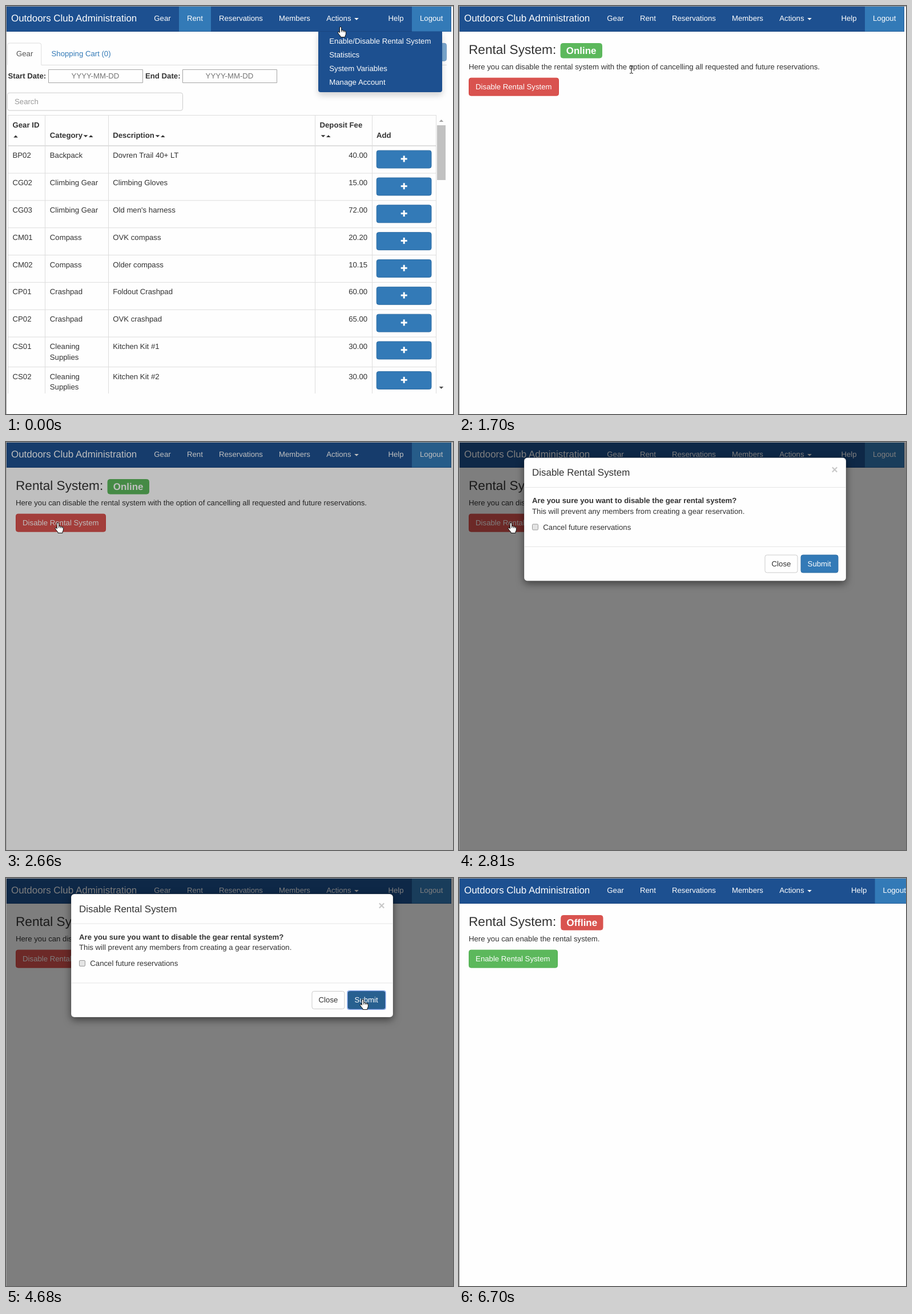
An HTML page with a canvas for the animation above (6800 ms loop, 783x715 px).

```html
<!DOCTYPE html>
<html lang="en">
<head>
<meta charset="utf-8">
<title>Rental system administration</title>
<style>
html, body { margin: 0; width: 100%; height: 100%; overflow: hidden; background: #fefefe; }
canvas { display: block; }
</style>
</head>
<body>
<canvas id="stage" width="783" height="715"></canvas>
<script>
const ctx = document.getElementById('stage').getContext('2d');
const LOOP = 6800;
const BODY = 13.19, LARGE = 16.96, HEADING = 22.6;
const WHITE = '#fefefe', INK = '#333', NAVY = '#1d5090', BLUE = '#337ab7';
const RED = '#d9534f', GREEN = '#5cb85c', LINE = '#ddd';

function text(str, x, y, color = INK, size = BODY, weight = 400, align = 'left') {
  ctx.font = `${weight} ${size}px "Liberation Sans", Arial, sans-serif`;
  ctx.textAlign = align;
  ctx.fillStyle = color;
  ctx.fillText(str, x, y);
}

function rect(x, y, w, h, color) {
  ctx.fillStyle = color;
  ctx.fillRect(x, y, w, h);
}

function box(x, y, w, h, radius, fill, border) {
  ctx.beginPath();
  ctx.roundRect(x + .5, y + .5, w - 1, h - 1, radius);
  ctx.fillStyle = fill;
  ctx.fill();
  ctx.strokeStyle = border || fill;
  ctx.lineWidth = 1;
  ctx.stroke();
}

function shadow(color, blur, dy) {
  ctx.shadowColor = color;
  ctx.shadowBlur = blur;
  ctx.shadowOffsetY = dy;
}

function focusRing(x, y, w, h) {
  ctx.beginPath();
  ctx.roundRect(x - .3, y - .3, w + .6, h + .6, 3);
  ctx.strokeStyle = 'rgba(105,150,230,.85)';
  ctx.lineWidth = 1.5;
  ctx.stroke();
}

function button(label, x, y, w, [fill, border], color = WHITE, focused = false) {
  box(x, y, w, 31.9, 3.5, fill, border);
  if (focused) focusRing(x, y, w, 31.9);
  text(label, x + 12.1, y + 20.1, color);
}

// dir 1 points down, -1 points up
function caret(x, y, dir, color = INK, r = 3.8) {
  ctx.beginPath();
  ctx.moveTo(x - r, y - dir * r / 2);
  ctx.lineTo(x + r, y - dir * r / 2);
  ctx.lineTo(x, y + dir * r / 2);
  ctx.fillStyle = color;
  ctx.fill();
}

function navbar(rentActive, shift) {
  rect(1, 1, shift ? 782 : 779, 44, '#1a4680');
  rect(2, 1, shift ? 781 : 777, 43, NAVY);
  if (rentActive) rect(303, 1, 56, 43.5, BLUE);
  rect(711 + shift, 1, 68.5, 43.5, BLUE);
  text('Outdoors Club Administration', 9, 27.2, WHITE, LARGE);
  const items = [['Gear', 259.3], ['Rent', 317], ['Reservations', 373], ['Members', 478],
    ['Actions', 561.3], ['Help', 669.5 + shift], ['Logout', 725 + shift]];
  for (const [label, x] of items) text(label, x, 25.8, WHITE);
  caret(614, 22.8, 1, WHITE);
}

const gear = [
  ['BP02', 'Backpack', 'Dovren Trail 40+ LT', '40.00'],
  ['CG02', 'Climbing Gear', 'Climbing Gloves', '15.00'],
  ['CG03', 'Climbing Gear', "Old men's harness", '72.00'],
  ['CM01', 'Compass', 'OVK compass', '20.20'],
  ['CM02', 'Compass', 'Older compass', '10.15'],
  ['CP01', 'Crashpad', 'Foldout Crashpad', '60.00'],
  ['CP02', 'Crashpad', 'OVK crashpad', '65.00'],
  ['CS01', 'Cleaning Supplies', 'Kitchen Kit #1', '30.00'],
  ['CS02', 'Cleaning Supplies', 'Kitchen Kit #2', '30.00']
];

function gearRow([id, category, description, fee], y) {
  const base = y + 21.2;
  text(id, 11.5, base);
  const lines = category.startsWith('Cleaning') ? category.split(' ') : [category];
  lines.forEach((line, i) => text(line, 76.8, base + i * 18.6));
  text(description, 187.2, base);
  text(fee, 633.2, base, INK, BODY, 400, 'right');
  box(648.7, y + 7.7, 96.8, 31.9, 3.5, BLUE, '#2e6da4');
  const cy = y + 22.9;
  rect(691.7, cy - 1.5, 11, 3, WHITE);
  rect(695.7, cy - 5.5, 3, 11, WHITE);
}

function gearTable() {
  const bold = (label, x, y) => text(label, x, y, INK, BODY, 700);
  ctx.save();
  ctx.beginPath();
  ctx.rect(0, 185, 783, 494);
  ctx.clip();
  rect(3, 191, 751, 1, LINE);
  rect(3, 244, 751, 1.9, LINE);
  for (const x of [3, 68, 179, 541, 641, 753]) rect(x, 191, 1, 488, LINE);
  bold('Gear ID', 11.5, 212.8);
  bold('Category', 76.8, 231.3);
  bold('Description', 187.2, 231.3);
  bold('Deposit Fee', 549.5, 212.8);
  bold('Add', 649, 231.3);
  caret(17, 228.5, -1);
  for (const x of [139.5, 265.5, 555.5]) {
    caret(x, 228.2, 1);
    caret(x + 9.3, 228.2, -1);
  }
  let y = 245;
  for (const row of gear) {
    if (y > 245) rect(3, y - .3, 751, 1, LINE);
    gearRow(row, y);
    y += row[1].startsWith('Cleaning') ? 52.6 : 47.83;
  }
  ctx.restore();
  rect(755, 209, 15, 96, '#c1c1c1');
  caret(762.5, 201, -1, '#a3a3a3');
  caret(762.5, 669, 1, '#505050');
}

function dateInput(x) {
  box(x, 111, 166, 24, 0, WHITE, '#a5a5a5');
  text('YYYY-MM-DD', x + 82.5, 127.3, '#757575', BODY, 400, 'center');
}

function rentPage(itemHover) {
  rect(62, 103, 710, 1, LINE);
  box(640, 64.8, 132, 31.9, 3.5, '#7aa8d0', '#7299c1');
  ctx.beginPath();
  ctx.moveTo(2.5, 103.5);
  ctx.lineTo(2.5, 68.5);
  ctx.arcTo(2.5, 65, 6, 65, 3.5);
  ctx.lineTo(58, 65);
  ctx.arcTo(61.8, 65, 61.8, 68.5, 3.5);
  ctx.lineTo(61.8, 103.5);
  ctx.strokeStyle = LINE;
  ctx.lineWidth = 1;
  ctx.stroke();
  text('Gear', 18, 87.8, '#555');
  text('Shopping Cart (0)', 79.5, 87.8, BLUE);
  text('Start Date:', 3.5, 127.3, INK, BODY, 700);
  text('End Date:', 244, 127.3, INK, BODY, 700);
  dateInput(74);
  dateInput(309);
  box(2, 151.7, 308, 31.9, 3.5, WHITE, '#ccc');
  text('Search', 15, 171.7, '#999');
  gearTable();

  ctx.save();
  shadow('rgba(0,0,0,.175)', 11, 5.6);
  ctx.beginPath();
  ctx.roundRect(547, 45, 217, 106, [0, 0, 4, 4]);
  ctx.fillStyle = NAVY;
  ctx.fill();
  ctx.restore();
  if (itemHover) rect(547, 50, 217, 24, BLUE);
  ['Enable/Disable Rental System', 'Statistics', 'System Variables', 'Manage Account']
    .forEach((label, i) => text(label, 566.3, 66.2 + i * 23.95, WHITE));
  navbar(true, 0);
}

function systemPage(t) {
  const online = t < 4960;
  const settled = t >= 5210;
  const nudge = settled ? .7 : 0;
  navbar(false, settled ? 17.6 : 0);
  text('Rental System:', 17, 83.6, INK, HEADING);
  box(177.6 + nudge, 65, online ? 73.4 : 74.2, 26.6, 4, online ? GREEN : RED);
  text(online ? 'Online' : 'Offline', 187.8 + nudge, 83.6, WHITE, LARGE, 700);
  if (online) {
    text('Here you can disable the rental system with the option of cancelling all requested and future reservations.', 17, 111.4);
    const pressed = t >= 2270 && t < 2660;
    const hovered = t >= 2000 && t < 2270;
    const look = pressed ? ['#ac2925', '#761c19'] : hovered ? ['#c9302c', '#ac2925'] : [RED, '#d43f3a'];
    button('Disable Rental System', 17, 125.7, 158, look, WHITE, t >= 2390 && t < 2660);
  } else {
    text('Here you can enable the rental system.', 17, 111.4);
    const focused = settled && t < 6700;
    button('Enable Rental System', 17, 125.7, settled ? 156 : 155,
      focused ? ['#449d44', '#255625'] : [GREEN, '#4cae4c'], WHITE, focused);
  }
}

function modal(t) {
  ctx.save();
  if (t < 2960) ctx.translate(0, -.5);
  ctx.save();
  shadow('rgba(0,0,0,.5)', 14, 4.7);
  ctx.beginPath();
  ctx.roundRect(114, 28, 564, 216, 5.6);
  ctx.fillStyle = WHITE;
  ctx.fill();
  ctx.restore();
  ctx.strokeStyle = 'rgba(0,0,0,.2)';
  ctx.lineWidth = 1;
  ctx.stroke();
  rect(114, 79.5, 564, 1, '#e5e5e5');
  rect(114, 183.5, 564, 1, '#e5e5e5');
  text('Disable Rental System', 128, 59.5, INK, LARGE);
  text('×', 658, 55, '#c8c8c8', 19.7, 700, 'center');
  text('Are you sure you want to disable the gear rental system?', 128, 107.8, INK, BODY, 700);
  text('This will prevent any members from creating a gear reservation.', 128, 126.4);
  box(128, 144, 11, 11, 1.5, '#e4e4e4', '#999');
  text('Cancel future reservations', 147.3, 154.2);
  const onClose = t >= 4170 && t < 4290;
  button('Close', 535.5, 198, 58, onClose ? ['#e6e6e6', '#adadad'] : [WHITE, '#ccc'], INK);
  const look = t < 4290 ? [BLUE, '#2e6da4'] : t >= 4560 && t < 4680 ? ['#204d74', '#122b40'] : ['#286090', '#204d74'];
  button('Submit', 598.5, 198, 66, look, WHITE, t >= 4560);
  ctx.restore();
}

const shapes = {
  arrow: new Path2D('M.5 .5V14.2L3.6 11.3L5.6 15.9L7.7 15L5.7 10.5H9.8Z'),
  hand: new Path2D('M-1.6 2Q-1.6 .5 0 .5T1.6 2V6.4Q4 5.6 4.4 7.2Q6.6 6.2 7.1 8Q9.4 7.4 9.4 9.6V13Q9.2 15 8 16.4V18.5H0V17Q-3 13.8-4.8 10.8Q-5 8.6-3.2 9.3L-1.6 10.8Z'),
  fingers: new Path2D('M1.6 6.4V9.6M4.4 7.2V9.8M7.1 8V10.2'),
  beam: new Path2D('M-3-6H-.8L0-5.2L.8-6H3M0-5.2V6.2M-3 7H-.8L0 6.2L.8 7H3')
};

// start time, x, y, shape
const pointer = [
  [0, 586, 36, 'hand'], [150, 587, 44, 'hand'], [270, 589, 55, 'hand'], [390, 589, 61, 'hand'],
  [660, 589, 61, 'arrow'], [1310, 572, 63, 'arrow'], [1430, 500, 76, 'arrow'], [1550, 417, 90, 'arrow'],
  [1700, 302, 111, 'beam'], [1850, 170, 138, 'hand'], [2000, 120, 140, 'hand'], [2120, 91, 141, 'hand'],
  [3360, 150, 147, 'hand'], [3480, 230, 155, 'hand'], [3630, 317, 169, 'arrow'],
  [3780, 405, 184, 'arrow'], [3900, 486, 199, 'arrow'], [4050, 525, 204, 'arrow'],
  [4170, 575, 208, 'hand'], [4290, 610, 211, 'hand'], [4410, 625, 212, 'hand'],
  [4960, 625, 211, 'arrow'], [5610, 611, 239, 'arrow'], [5760, 602, 290, 'arrow'],
  [5880, 612, 455, 'arrow'], [6000, 644, 639, 'arrow'], [6150, 676, 680, 'arrow'],
  [6270, 707, 714, 'arrow'], [6420, 0, 0, 'none']
];

function drawPointer(t) {
  const [, x, y, kind] = pointer.findLast(step => step[0] <= t);
  if (kind === 'none') return;
  ctx.save();
  ctx.translate(x, y);
  ctx.lineJoin = 'round';
  ctx.lineWidth = 1;
  ctx.strokeStyle = '#111';
  ctx.fillStyle = '#fff';
  if (kind !== 'beam') ctx.fill(shapes[kind]);
  ctx.stroke(shapes[kind]);
  if (kind === 'hand') ctx.stroke(shapes.fingers);
  ctx.restore();
}

function render(t) {
  rect(0, 0, 783, 715, WHITE);
  if (t < 540) rentPage(t >= 270);
  else systemPage(t);
  if (t >= 2660 && t < 4960) {
    rect(0, 0, 783, 715, `rgba(0,0,0,${t < 2810 ? .25 : .5})`);
    if (t >= 2810) modal(t);
  }
  rect(0, 0, 783, 1, '#a0a0a0');
  rect(0, 0, 1, 715, '#a0a0a0');
  drawPointer(t);
}

ctx.textRendering = 'geometricPrecision';
const start = performance.now();
function tick() {
  render((performance.now() - start) % LOOP);
  requestAnimationFrame(tick);
}
tick();
</script>
</body>
</html>
```
